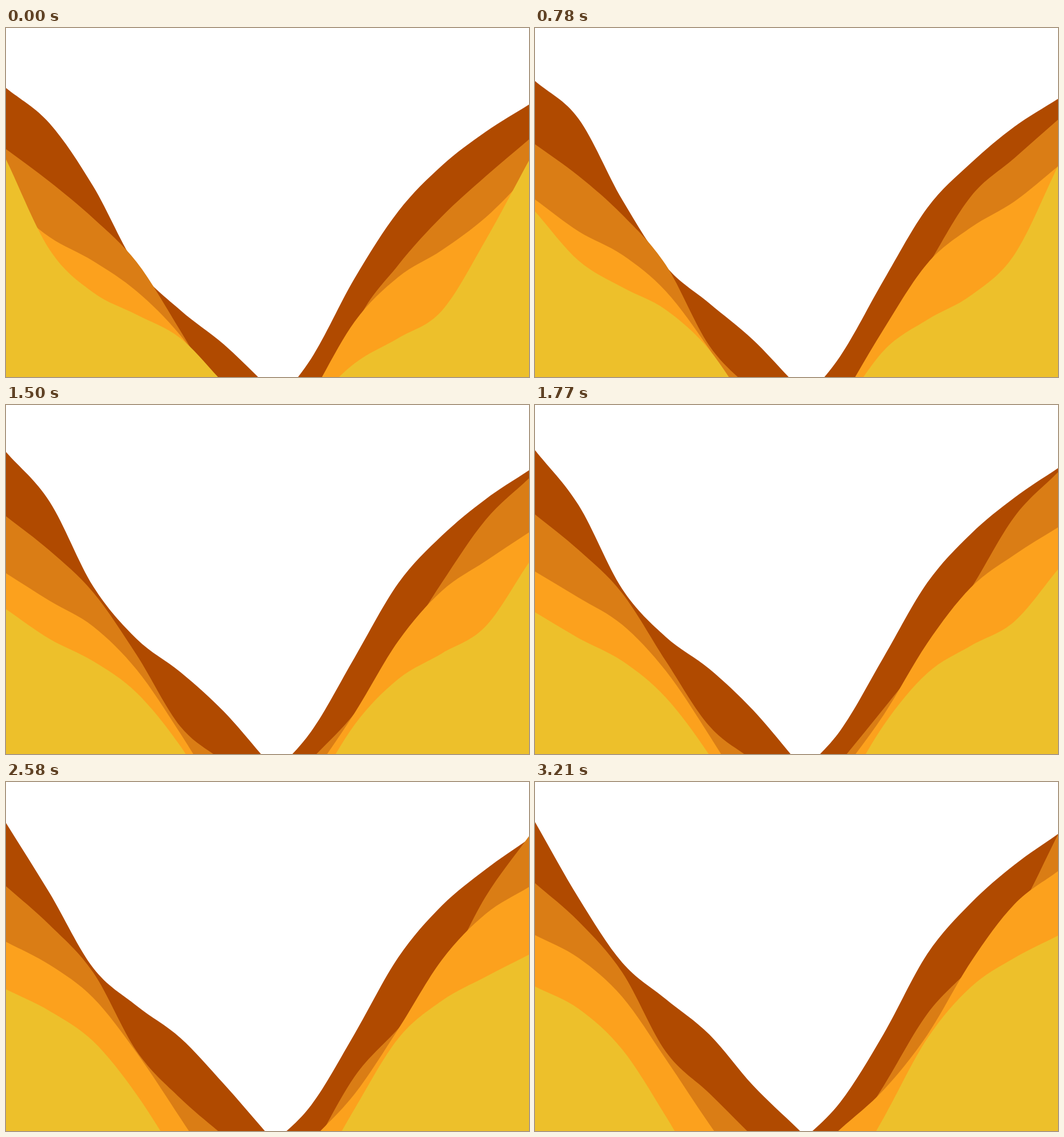
Animation of 916 by 611 pixels, one loop 3.38 s. Source, as an HTML page with a canvas:

```html
<!DOCTYPE html>
<html lang="en">
<head>
<meta charset="utf-8">
<title>Valley</title>
<style>
html, body { margin: 0; height: 100%; overflow: hidden; background: #fff; }
canvas { display: block; }
</style>
</head>
<body>
<canvas width="916" height="611"></canvas>
<script>
const W = 916, H = 611, STEP = W / 12;
const LOOP = 3380, TICK = 30, LAST = 3210;
const KEYS = [0, 1230, 2250, LAST];
const ctx = document.querySelector('canvas').getContext('2d');

// Each slope lists heights from the stage edge inwards, one row per key time.
const slope = (color, right, ...rows) => ({ color, right, rows });

const slopes = [
  slope('#b04a00', false,
    [105, 167, 277, 418, 494, 554, 627],
    [86, 164, 312, 413, 473, 540, 625],
    [74, 187, 326, 398, 453, 530, 620],
    [70, 203, 316, 380, 442, 531, 605]),
  slope('#b04a00', true,
    [134, 182, 241, 321, 438, 579, 675],
    [118, 168, 232, 313, 442, 573, 660],
    [104, 157, 220, 309, 441, 568, 645],
    [91, 145, 212, 301, 441, 561, 637]),
  slope('#da7d15', false,
    [212, 269, 333, 410, 530, 660],
    [198, 256, 327, 428, 562, 628],
    [186, 252, 332, 464, 558, 620],
    [177, 244, 333, 472, 545, 621]),
  slope('#da7d15', true,
    [195, 260, 330, 415, 525, 760],
    [140, 210, 302, 426, 547, 622],
    [102, 194, 338, 436, 519, 640],
    [92, 240, 325, 406, 532, 650]),
  slope('#fca11d', false,
    [303, 366, 408, 461, 538, 645],
    [297, 348, 391, 462, 571, 695],
    [285, 327, 380, 470, 584, 705],
    [268, 308, 376, 485, 599, 705]),
  slope('#fca11d', true,
    [256, 332, 389, 436, 514, 645],
    [231, 285, 333, 411, 535, 655],
    [197, 243, 313, 426, 546, 637],
    [156, 214, 315, 443, 539, 608]),
  slope('#edc02b', false,
    [230, 388, 463, 502, 543, 622],
    [348, 410, 450, 498, 583, 705],
    [365, 404, 450, 531, 644, 770],
    [358, 397, 468, 585, 716, 840]),
  slope('#edc02b', true,
    [232, 372, 495, 543, 587, 660],
    [262, 394, 448, 491, 560, 680],
    [302, 358, 398, 455, 566, 700],
    [269, 308, 359, 449, 588, 720])
];

// Cubic blend of the key times
const weights = t => KEYS.map((a, i) =>
  KEYS.reduce((w, b, j) => i === j ? w : w * (t - b) / (a - b), 1));

function drawSlope({ color, right, rows }, w) {
  const y = rows[0].map((_, i) => rows.reduce((sum, row, k) => sum + row[i] * w[k], 0));
  const n = y.length - 1;
  const px = i => right ? W - i * STEP : i * STEP;
  const at = i => i < 0 ? 2 * y[0] - y[1] : i > n ? 2 * y[n] - y[n - 1] : y[i];
  const tilt = i => (at(i + 1) - at(i - 1)) / 6;

  ctx.fillStyle = color;
  ctx.beginPath();
  ctx.moveTo(px(0), y[0]);
  for (let i = 0; i < n; i++) {
    ctx.bezierCurveTo(px(i + 1 / 3), y[i] + tilt(i),
      px(i + 2 / 3), y[i + 1] - tilt(i + 1), px(i + 1), y[i + 1]);
  }
  ctx.lineTo(px(n + 1), at(n + 1));
  ctx.lineTo(px(n + 1), 2 * H);
  ctx.lineTo(px(0), 2 * H);
  ctx.fill();
}

function frame() {
  const t = Math.min(LAST, Math.floor(performance.now() % LOOP / TICK) * TICK);
  const w = weights(t);
  ctx.fillStyle = '#fff';
  ctx.fillRect(0, 0, W, H);
  slopes.forEach(s => drawSlope(s, w));
  requestAnimationFrame(frame);
}
frame();
</script>
</body>
</html>
```
